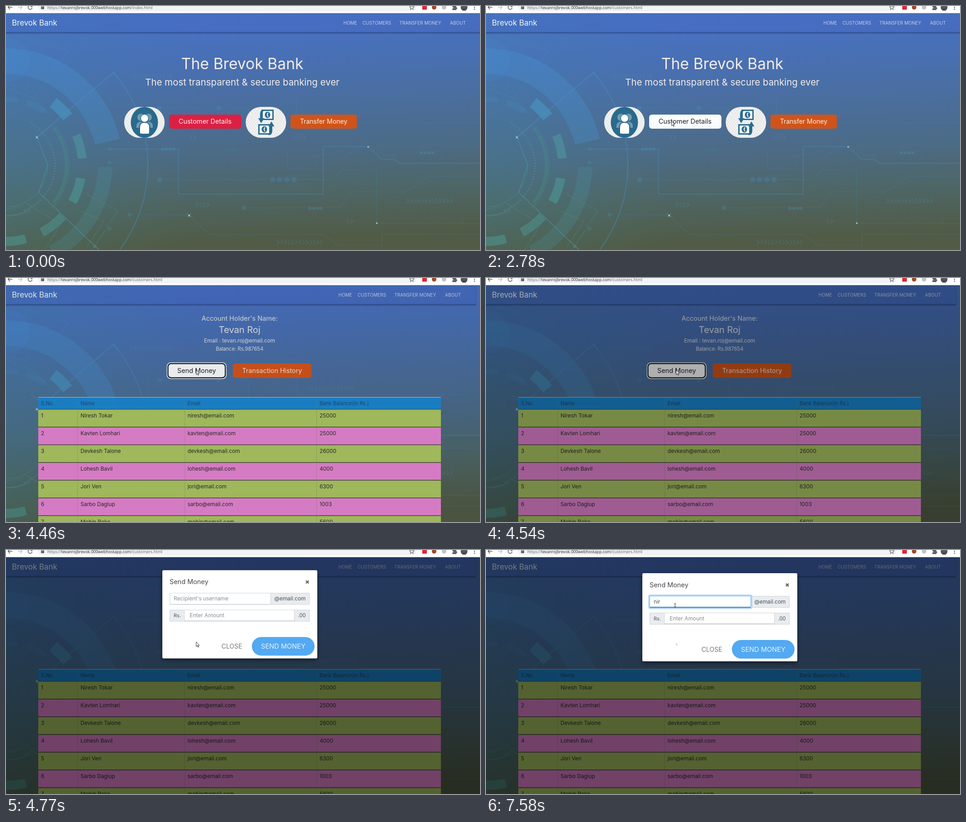
These frames come from a looping animation (1043 by 537 pixels, 8 s). An HTML page:

```html
<!DOCTYPE html>
<html lang="en">
<head>
<meta charset="utf-8">
<title>Brevok Bank</title>
<style>
html, body { margin: 0; width: 100%; height: 100%; overflow: hidden; background: #4a6c94; }
svg { display: block; width: 100vw; height: 100vh; font-family: Inter, sans-serif; }
.chrome text { font-family: "Open Sans", sans-serif; }
</style>
</head>
<body>
<svg id="stage" viewBox="0 0 1043 537" preserveAspectRatio="none"></svg>
<script>
const LOOP = 8000;

const BURSTS = [
  [0, 0, 1], [200, 280, 2], [510, 680, 3], [1070, 1680, 9], [1830, 1920, 2], [2060, 2060, 1],
  [2380, 2550, 3], [2780, 2780, 1], [3090, 3090, 1], [3700, 3930, 4], [4250, 4250, 1],
  [4460, 4930, 7], [5240, 5780, 8], [5930, 6160, 4], [6490, 6490, 1], [6670, 6670, 1],
  [6890, 6890, 1], [7050, 7050, 1], [7580, 7580, 1]
];
// The recording clock counts in hundredths of a second.
const TICKS = BURSTS.flatMap(([a, b, n]) =>
  Array.from({ length: n }, (_, i) => n > 1 ? Math.floor((a + (b - a) * i / (n - 1)) / 10) * 10 : a));

// Pointer path: time, x, y
const POINTER = [
  [200, 722, 452], [280, 585, 411], [430, 585, 411], [680, 385, 311], [990, 385, 311],
  [1530, 408, 253], [3620, 408, 253], [3930, 418, 202], [5160, 418, 202],
  [5450, 424, 165], [5780, 416, 122]
];

const clamp = v => Math.max(0, Math.min(1, v));
const mix = (a, b, k) => `rgb(${a.map((v, i) => Math.round(v + (b[i] - v) * k))})`;

// ---- markup helpers ----
const rect = (x, y, w, h, fill, more = '') =>
  `<rect x="${x}" y="${y}" width="${w}" height="${h}" fill="${fill}" ${more}/>`;
const circle = (x, y, r, fill, more = '') =>
  `<circle cx="${x}" cy="${y}" r="${r}" fill="${fill}" ${more}/>`;
const line = (d, stroke, width = 1, more = '') =>
  `<path d="${d}" fill="none" stroke="${stroke}" stroke-width="${width}" ${more}/>`;
const text = (x, y, size, str, fill, more = '') =>
  `<text x="${x}" y="${y}" font-size="${size}" fill="${fill}" ${more}>${str}</text>`;
const MID = 'text-anchor="middle"';
const centred = (x, y, size, str, fill, more = '') => text(x, y, size, str, fill, MID + ' ' + more);
const group = (id, body, more = '') => `<g id="${id}" ${more}>${body}</g>`;
const focusRing = (id, x, y, w, h) => group(id,
  rect(x - 1.5, y - 1.5, w + 3, h + 3, 'none', 'rx="8" stroke="#fff" stroke-width="1.5"') +
  rect(x + .5, y + .5, w - 1, h - 1, 'none', 'rx="7" stroke="#101418" stroke-width="2"'));

// ---- backdrop artwork ----
const HUB_Y = 350;
function arc(r, from, to, width, colour, opacity, more = '') {
  const at = deg => {
    const a = deg * Math.PI / 180;
    return `${(r * Math.cos(a)).toFixed(1)} ${(HUB_Y + r * Math.sin(a)).toFixed(1)}`;
  };
  return line(`M${at(from)}A${r} ${r} 0 0 1 ${at(to)}`, colour, width, `opacity="${opacity}" ${more}`);
}
function chevrons(x, y, n) {
  let d = '';
  for (let i = 0; i < n; i++) d += `M${x + i * 8} ${y - 5}l5 5-5 5`;
  return line(d, '#4a94c0', 2, 'opacity=".4"');
}
const squares = (x, y) => [0, 8, 16, 24].map(i => rect(x + i, y - 3, 6, 6, '#4a98c4', 'opacity=".5"')).join('');

function artwork() {
  const blue = '#4690c4', teal = '#4fa8a4';
  const wires = [
    'M228 315H379V414H698V309H797L827 337H853L866 346H1043',
    'M228 345H291L318 382H720L742 360H816V478H1043',
    'M272 459H403L447 503H700L730 527H827V502H1043',
    'M312 262V225H534V262', 'M560 262L636 188L639 190V257H1043',
    'M620 315V358H683V330L740 318', 'M740 338L775 310', 'M524 444H660M700 444H735L760 409H880L930 375H1043'
  ];
  const dots = [[338, 225, 5], [468, 225, 5], [338, 382, 6], [587, 382, 6], [602, 382, 6], [618, 382, 6],
    [634, 382, 6], [228, 315, 4], [228, 345, 4], [272, 459, 4], [228, 490, 4], [524, 444, 5], [195, 529, 4]];
  const hub = circle(5, 118, 48, '#4a90e0', 'opacity=".18"') +
    arc(229, -90, -13, 56, '#4a98dc', .36) +
    arc(218, 1, 62, 32, '#4a9aa8', .28) +
    arc(312, -41, 42, 1.6, blue, .75) +
    arc(285, -90, -60, 1, blue, .35) +
    arc(172, -53, -38, 25, '#48a4d0', .62) +
    arc(168, -23, -5, 19, teal, .58) +
    arc(167, 10, 29, 20, teal, .58) +
    arc(168, 42, 62, 20, teal, .5) +
    arc(168, 75, 92, 20, teal, .55) +
    arc(145, -90, -80, 10, blue, .32) + arc(145, -72, -54, 13, blue, .32) +
    arc(133, -38, 38, 7, '#4c9c86', .35) + arc(139, -38, 42, 1, teal, .5) +
    arc(108, -60, 70, 2, '#62b4c4', .6, 'stroke-dasharray="2 4"') +
    arc(92, 5, 90, 1, teal, .45) + arc(112, 62, 90, 2, teal, .5) +
    line('M237 146L68 289L92 350L72 410L205 537M237 146L247 158', '#4a98b8', 1.8, 'opacity=".68"') +
    line('M16 62L137 100L60 203L0 180M0 150L51 158L45 181L0 171M60 203L95 238', blue, 1.1, 'opacity=".5"') +
    line('M178 415L246 450L190 537M160 450L215 475L178 530M44 434L120 480L85 537M0 448L38 438', teal, 1.1, 'opacity=".38"');
  const circuit = wires.map((d, i) => line(d, '#4690c4', i ? 1.2 : 1.7, `opacity="${i ? .42 : .7}"`)).join('') +
    dots.map(([x, y, r]) => circle(x, y, r, '#4690c0', 'opacity=".45"')).join('') +
    chevrons(273, 154, 12) + chevrons(404, 289, 2) + chevrons(631, 290, 4) + chevrons(664, 244, 13) +
    chevrons(418, 438, 4) + chevrons(881, 429, 13) + chevrons(750, 474, 2) + chevrons(596, 520, 13) +
    squares(342, 315) + squares(911, 323) + squares(666, 445) +
    `<g opacity=".4">${squares(482, 317)}${squares(830, 328)}</g>`;
  const sparks = [[68, 289], [403, 461], [797, 310], [816, 478]].map(([x, y], i) =>
    circle(x, y, 2, '#b8dcd8', 'opacity=".7"') +
    (i < 2 ? line(`M${x - 4} ${y - 4}l8 8m0-8l-8 8`, '#b8dcd8', 1, 'opacity=".5"') : '')).join('');
  return rect(0, 16, 1043, 521, 'url(#sky)') + rect(0, 16, 400, 521, 'url(#glow)') +
    `<g opacity=".74">${hub}</g><g opacity=".62">${circuit}</g>` + sparks;
}

// ---- page parts ----
const nav = (width, shift) =>
  rect(0, 16, width, 42, '#4268c0', 'opacity=".4"') + rect(0, 57.5, width, 5, 'url(#shade)') +
  (shift ? rect(width, 18, 1, 40, '#2a4488', 'opacity=".35"') : '') +
  text(13, 43, 16.9, 'Brevok Bank', '#f4f6fa') +
  [[742.5, 'HOME'], [784.5, 'CUSTOMERS'], [865.5, 'TRANSFER MONEY'], [977, 'ABOUT']]
    .map(([x, s]) => text(x - shift, 41, 10, s, '#c3cfe8')).join('');

const person = (x, y, fill) => circle(x, y, 8, fill) +
  `<path d="M${x - 10} ${y + 31}v-12q0-9 10-9t10 9v12q0 3-3 3h-14q-3 0-3-3z" fill="${fill}"/>`;
const note = (x, y) => rect(x, y, 27, 23, '#2a6e90') +
  rect(x + 3, y + 3, 21, 17, '#f2f4f5') + `<ellipse cx="${x + 13.5}" cy="${y + 11.5}" rx="6" ry="7" fill="#2a6e90"/>` +
  line(`M${x + 15} ${y + 7}q-4 4 0 9`, '#f2f4f5', 2);
const pill = x => rect(x, 222, 89, 68, '#f3f3f3', 'rx="34"') + rect(x, 222, 89, 68, 'url(#hatch)', 'rx="34"');

const home = () => nav(1043, 0) +
  centred(520, 139, 33.6, 'The Brevok Bank', '#f3ece4') +
  centred(520, 175, 20.4, 'The most transparent &amp; secure banking ever', '#f3ece4') +
  pill(260) + '<ellipse cx="304.500" cy="256" rx="30" ry="34" fill="#2a6a8c"/>' +
  person(297, 245, '#6f9db4') + person(313, 245, '#6f9db4') + rect(285, 268, 40, 14, '#2a6a8c') +
  line('M294 279v-12q0-10 11-10t11 10v12', '#2a6a8c', 3) + circle(305, 247, 9.5, '#2a6a8c') + person(305, 247, '#fff') +
  pill(527.5) + note(562, 228) + note(555, 260) +
  line('M566 230q-5 1-5 8v10M577 282h3q4-1 4-7v-12', '#2a6e90', 4) +
  '<path d="M555 247h13l-6.500 11zM577.500 265h13l-6.500-11z" fill="#2a6e90"/>' +
  rect(359, 239, 159, 31, '#dc2043', 'id="detailsBox" rx="6"') +
  centred(438, 259, 14.4, 'Customer Details', '#fff', 'id="detailsLabel"') +
  focusRing('detailsRing', 359, 239, 159, 31) +
  rect(626, 239, 146, 31, '#d05419', 'rx="6"') + centred(699, 259, 14, 'Transfer Money', '#fbeee6');

const PEOPLE = [
  ['Niresh Tokar', 25000], ['Kavten Lomhari', 25000], ['Devkesh Talone', 26000], ['Lohesh Bavil', 4000],
  ['Jori Ven', 6300], ['Sarbo Daglup', 1003], ['Mohin Beke', 5600]
];
const COLUMNS = [77, 164, 399.5, 690];
const cells = (values, y, size, fill) => values.map((v, i) => text(COLUMNS[i], y, size, v, fill)).join('');

const table = () => rect(71, 263, 886, 27, '#1b87d2', 'opacity=".95"') +
  cells(['S.No.', 'Name', 'Email', 'Bank Balance(in Rs.)'], 279.5, 11.2, '#1d4a72') +
  PEOPLE.map(([name, balance], i) => {
    const y = 289.5 + 39 * i;
    const mail = name.split(' ')[0].toLowerCase() + '@email.com';
    return rect(71, y, 886, 39, i % 2 ? '#e484d2' : '#aac562') +
      rect(71, y - 1, 886, 1, i ? '#1c2014' : '#3a5a30') +
      cells([i + 1, name, mail, balance], y + 17.5, 11.8, '#2a2c2a');
  }).join('') +
  line('M71 262.500H957', '#b8cbd8', 1) + line('M157.500 263V537M393.500 263V537M683.500 263V537', '#7c8468', 1, 'opacity=".4"');

const account = () => nav(1034, 11) +
  centred(514, 94, 14.5, 'Account Holder\'s Name:', '#e4e4e4') +
  centred(514, 120.5, 20, 'Tevan Roj', '#e4e4e4') +
  centred(514, 141.5, 11.8, 'Email : tevan.roj@email.com', '#e4e4e4') +
  centred(514, 160, 11.1, 'Balance: Rs.987654', '#e4e4e4') +
  rect(356, 188, 127, 32, '#dc2043', 'id="sendBox" rx="6"') +
  centred(419.5, 209, 14.4, 'Send Money', '#fff', 'id="sendLabel"') +
  focusRing('sendRing', 356, 188, 127, 32) +
  rect(499, 188, 173, 32, '#d2551c', 'rx="6"') + centred(585.5, 209, 14.3, 'Transaction History', '#f4e6dc') +
  table();

const field = (x, y, w, fill) => rect(x + .5, y + .5, w - 1, 25, fill, 'stroke="#ced4da"');
const modal = () =>
  rect(344, 51, 341, 194, '#fff', 'rx="3" filter="url(#drop)"') +
  text(360, 82, 14.4, 'Send Money', '#43474b') +
  line('M660 74l6 6m0-6l-6 6', '#6c6c6c', 2.6) +
  field(582, 101, 86, '#e9ecef') + text(590.5, 118, 11.9, '@email.com', '#495057') +
  field(360, 101, 223, '#fff') +
  group('focus',
    rect(358.5, 99.5, 226, 29, 'none', 'id="halo" rx="3" stroke="#b5d4fb" stroke-width="3"') +
    rect(360.5, 101.5, 222, 25, '#fff', 'id="inner" stroke="#80bdff"') +
    rect(361, 125, 221, 2, '#2c8a9c', 'id="underline"')) +
  rect(361, 125.5, 221, 1, '#c4c8cc', 'id="restLine"') +
  text(369, 118, 11.8, 'Recipient\'s username', '#868d94', 'id="hint"') +
  text(369, 118, 11.8, '', '#495057', 'id="typed"') +
  rect(369, 108, 1, 13, '#333', 'id="caret"') +
  field(360, 138, 33, '#e9ecef') + text(369, 155, 10.8, 'Rs.', '#495057') +
  field(634, 138, 34, '#e9ecef') + text(642.5, 155, 11.2, '.00', '#495057') +
  field(392, 138, 243, '#fff') + rect(393, 161.5, 241, 1.5, '#d0d4d8') + text(404, 155, 11.9, 'Enter Amount', '#868d94') +
  centred(497, 224, 14, 'CLOSE', '#72777c') +
  rect(541, 198, 138, 41, '#53a9f2', 'rx="20.5"') + centred(610, 224, 14.6, 'SEND MONEY', '#eaf4fd');

const browser = () => rect(0, 0, 1043, 16, '#fff') + rect(0, 15, 1043, 1, '#c8d0e0') +
  rect(68, -16, 837, 28, '#f1f3f4', 'rx="14"') +
  line('M14 3H5M9-1.500L4.500 3L9 7.500', '#5f6368', 1.5) + line('M26 3H35M31-1.500L35.500 3L31 7.500', '#c0c3c7', 1.5) +
  line('M56.500 0A4.500 4.500 0 1 0 57.500 4M57.500-2V1.500H54', '#5f6368', 1.5, 'id="reload"') +
  line('M49-1l8 8m0-8l-8 8', '#5f6368', 1.5, 'id="stop"') +
  rect(77, 1.5, 7, 5.5, '#5f6368', 'rx="1"') + line('M78.500 2V0a2 2 0 0 1 4 0V2', '#5f6368', 1.2) +
  text(91, 6.5, 9, 'https://<tspan fill="#202124">tevanrojbrevok.000webhostapp.com</tspan>/<tspan id="file"></tspan>', '#5f6368') +
  line('M893-2l1.500 3.300 3.500.4-2.600 2.400.8 3.500-3.200-1.800-3.200 1.800.8-3.500-2.600-2.400 3.500-.4z', '#5f6368', 1.1) +
  rect(916, -2, 10, 10, '#d8283c') + circle(942, 3, 5, '#a8432c') + circle(964, 3, 5, '#c2c5c9') +
  '<path d="M982 0h3a2 2 0 0 1 4 0h2v3a2 2 0 0 1 0 4v2h-9v-3a2 2 0 0 0 0-4z" fill="#5f6368"/>' +
  circle(1008, 3, 7.5, 'url(#portrait)') +
  [-1, 3, 7].map(y => circle(1031, y, 1.3, '#5f6368')).join('');

const stop = (offset, colour, opacity = 1) =>
  `<stop offset="${offset}" stop-color="${colour}" stop-opacity="${opacity}"/>`;
const defs = `<defs>
  <linearGradient id="sky" x2=".08" y2="1">${stop(0, '#4a72c6')}${stop(.2, '#4870b8')}${stop(.42, '#4a6e9e')}
    ${stop(.62, '#4c6b86')}${stop(.8, '#4e6666')}${stop(1, '#515b45')}</linearGradient>
  <linearGradient id="glow">${stop(0, '#3f8c9c', .2)}${stop(1, '#3f8c9c', 0)}</linearGradient>
  <linearGradient id="shade" x2="0" y2="1">${stop(0, '#25407c', .75)}${stop(1, '#25407c', 0)}</linearGradient>
  <linearGradient id="portrait" x2="0" y2="1">${stop(0, '#6a7078')}${stop(1, '#3c3f48')}</linearGradient>
  <pattern id="hatch" width="6" height="8" patternUnits="userSpaceOnUse">${line('M0 0L6 8M6 0L0 8', '#dadada', .7)}</pattern>
  <filter id="drop" x="-10%" y="-10%" width="120%" height="125%">
    <feDropShadow dx="0" dy="3" stdDeviation="4" flood-opacity=".55"/></filter>
</defs>`;

const stage = document.getElementById('stage');
stage.innerHTML = defs + artwork() + group('home', home()) + group('account', account()) +
  rect(0, 16, 1043, 521, '#000', 'id="dim"') + group('modal', modal()) +
  group('browser', browser(), 'class="chrome"') +
  '<path id="trace" d="M418 203v7l5-.5z" fill="#dcdcdc"/>' +
  group('pointer', circle(0, 0, 8.5, '#f8ee30', 'id="click" opacity=".9"') +
    '<path id="arrow" d="M.5 0V10.500L3 8.300L4.600 12L6 11.400L4.400 7.700H7.300Z" fill="#fff" stroke="#20242c" stroke-width=".9"/>' +
    line('M-2-4h1.500L0-3.500L.5-4H2M0-3.500V3.500M-2 4h1.500L0 3.500L.5 4H2', '#222', 1, 'id="beam"'));

const el = Object.fromEntries([...stage.querySelectorAll('[id]')].map(n => [n.id, n]));
const set = (id, name, value) => el[id].setAttribute(name, value);
const show = (id, on) => set(id, 'visibility', on ? 'inherit' : 'hidden');
const page = (id, on) => set(id, 'display', on ? 'inline' : 'none');

function pointerAt(t) {
  const i = POINTER.findIndex(p => p[0] > t);
  if (i < 0) return POINTER[POINTER.length - 1].slice(1);
  if (i === 0) return POINTER[0].slice(1);
  const [t0, x0, y0] = POINTER[i - 1], [t1, x1, y1] = POINTER[i];
  const k = (t - t0) / (t1 - t0);
  return [x0 + (x1 - x0) * k, y0 + (y1 - y0) * k];
}

function hover(name, k) {
  set(name + 'Box', 'fill', mix([220, 32, 67], [250, 252, 253], k));
  set(name + 'Label', 'fill', mix([255, 240, 240], [30, 34, 40], k));
}

function draw(now) {
  const t = TICKS.filter(tick => tick <= now + .01).pop();
  const within = (a, b) => t >= a && t < b;

  page('home', t < 3090);
  page('account', t >= 3090);
  el.file.textContent = t < 2380 ? 'index.html' : 'customers.html';
  show('reload', !within(2060, 2780));
  show('stop', within(2060, 2780));

  hover('details', clamp((t - 1380) / 300));
  hover('send', clamp((t - 3770) / 160));
  show('detailsRing', within(1830, 2460));
  show('sendRing', t >= 4250);

  set('dim', 'opacity', .5 * clamp((t - 4440) / 150));
  const slide = 1 - clamp((t - 4600) / 300);
  page('modal', t >= 4600);
  set('modal', 'opacity', clamp((t - 4600) / 150));
  set('modal', 'transform', `translate(0 ${(-35 * slide * slide).toFixed(2)})`);

  const focus = clamp((t - 5900) / 250);
  show('focus', t >= 5930);
  show('restLine', t < 5930);
  set('halo', 'opacity', focus);
  set('inner', 'stroke-opacity', focus);
  set('underline', 'fill', mix([30, 138, 140], [56, 138, 190], focus));

  const letters = [6670, 6890, 7050].filter(at => t >= at).length;
  el.typed.textContent = 'nir'.slice(0, letters);
  show('hint', !letters);
  show('caret', within(5930, 6490) || within(6670, 7580));
  set('caret', 'x', 369 + (letters ? el.typed.getComputedTextLength() : 0));

  const [x, y] = pointerAt(t);
  const overField = t > 5240 && y < 128;
  show('pointer', t >= 200);
  set('pointer', 'transform', `translate(${x.toFixed(1)} ${y.toFixed(1)})`);
  show('arrow', !overField);
  show('beam', overField);
  show('click', within(1830, 2060) || within(4250, 4460) || within(5930, 6080));
  show('trace', t >= 5240);
}

function tick() {
  draw(performance.now() % LOOP);
  requestAnimationFrame(tick);
}
tick();
</script>
</body>
</html>
```
